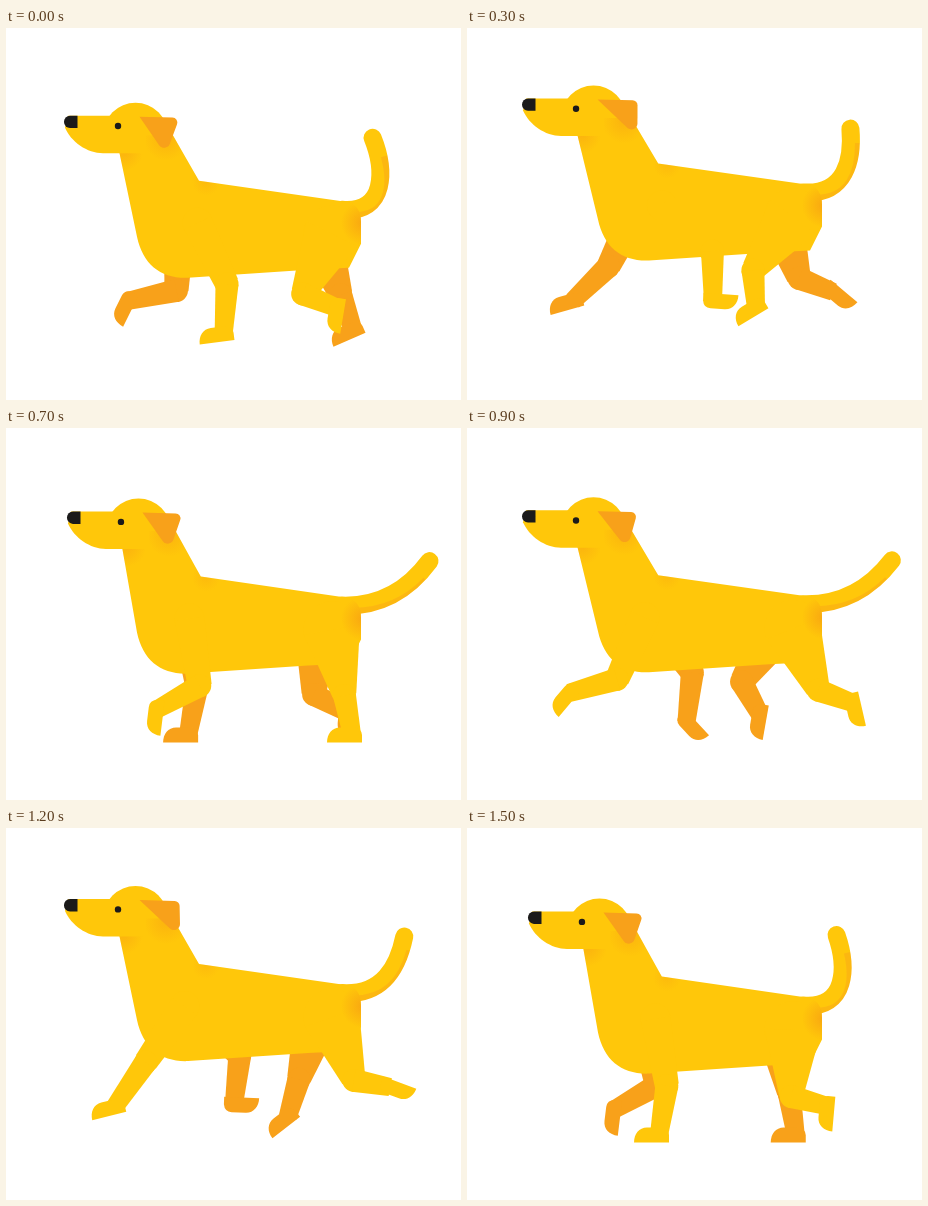
Recreate the animation shown at these times as an HTML page with a canvas. Size 455 px wide and 372 px high, loop 1600 ms.

```html
<!DOCTYPE html>
<html>
<head>
<meta charset="utf-8">
<title>Walking dog</title>
<style>
html, body { margin: 0; width: 100%; height: 100%; overflow: hidden; background: #fff; }
canvas { display: block; }
</style>
</head>
<body>
<canvas id="stage" width="455" height="372"></canvas>
<script>
const ctx = document.getElementById('stage').getContext('2d');
const YELLOW = '#ffc70a', ORANGE = '#f8a11a', BLACK = '#1b1a1a';
const STEPS = 16, STEP_MS = 100, GROUND = 307;

// Each leg type walks its foot along a closed smooth path: x, y, toe angle (90 = toe down).
// The far leg follows the same path half a cycle later with a shorter stride.
const FORE = {
  thigh: 68, shank: 50, bend: 1, follow: 0.12, pivot: 126, stride: 0.85, drop: 0,
  path: [[236, 294, 133], [246, 273, 176], [234, 283, 164], [150, 282, 83],
    [102, 265, 50], [102, 273, 16], [124, 287, 14], [192, 312, 0]]
};
const HIND = {
  thigh: 67, shank: 37, bend: -1, follow: 0, pivot: 250, stride: 0.82, drop: 6,
  path: [[302, 280, 80], [289, 279, 31], [296, 290, 45], [346, 312, 0],
    [386, 275, 103], [392, 258, 140], [374, 264, 165], [360, 278, 85]]
};

// Closed Catmull-Rom spline; u counts key points.
function spline(points, u) {
  const n = points.length, i = Math.floor(u), f = u - i;
  const [a, b, c, d] = [-1, 0, 1, 2].map(k => points[(i + k + n) % n]);
  return b.map((v, j) => v + f / 2 * (c[j] - a[j]
    + f * (2 * a[j] - 5 * v + 4 * c[j] - d[j] + f * (3 * (v - c[j]) + d[j] - a[j]))));
}

function disc(x, y, r) {
  ctx.beginPath();
  ctx.arc(x, y, r, 0, 7);
  ctx.fill();
}

function taper(x1, y1, r1, x2, y2, r2) {
  const len = Math.hypot(x2 - x1, y2 - y1);
  const nx = (y1 - y2) / len, ny = (x2 - x1) / len;
  ctx.beginPath();
  ctx.moveTo(x1 + nx * r1, y1 + ny * r1);
  ctx.lineTo(x2 + nx * r2, y2 + ny * r2);
  ctx.lineTo(x2 - nx * r2, y2 - ny * r2);
  ctx.lineTo(x1 - nx * r1, y1 - ny * r1);
  ctx.fill();
}

function foot(x, y, angle) {
  ctx.save();
  ctx.translate(x, y);
  ctx.rotate(-angle * Math.PI / 180);
  ctx.beginPath();
  ctx.moveTo(10, 7.5);
  ctx.lineTo(-25, 7.5);
  ctx.bezierCurveTo(-25, -1, -20, -7.5, -12, -7.5);
  ctx.lineTo(2, -7.5);
  ctx.quadraticCurveTo(9, -7.5, 10, 0);
  ctx.fill();
  ctx.restore();
}

function leg(kind, step, far, hipX, hipY, hipR) {
  const phase = (step + (far ? 8 : 0) + STEPS - 1) % STEPS;
  let [x, y, angle] = spline(kind.path, phase / 2);
  if (far) {
    x = kind.pivot + (x - kind.pivot) * kind.stride;
    y += kind.drop;
  }
  y = Math.min(y, GROUND);
  angle *= Math.min(1, (GROUND - y) / 10);   // lies flat on the ground

  // Knee from the two bone lengths.
  const hx = hipX + (x - hipX) * kind.follow;
  const { thigh, shank, bend } = kind;
  const reach = Math.hypot(x - hx, y - hipY);
  const cos = (thigh ** 2 + reach ** 2 - shank ** 2) / (2 * thigh * reach);
  const turn = Math.atan2(x - hx, y - hipY) + bend * Math.acos(Math.min(1, cos));
  const kx = hx + thigh * Math.sin(turn), ky = hipY + thigh * Math.cos(turn);

  ctx.fillStyle = far ? ORANGE : YELLOW;
  disc(hx, hipY, hipR);
  taper(hx, hipY, hipR, kx, ky, 12);
  disc(kx, ky, 11.5);
  taper(kx, ky, 11.5, x, y, 9);
  foot(x, y, angle);
}

function tail(step) {
  const s = (1 - Math.cos((step - 0.15) * Math.PI / 8)) / 2;
  const path = () => {
    ctx.beginPath();
    ctx.moveTo(336, 183);
    ctx.bezierCurveTo(381 - 7 * s, 187 - 3 * s, 379 + 25 * s, 142 + 26 * s, 366.5 + 60 * s, 111 + 29 * s);
    ctx.stroke();
  };
  ctx.save();
  ctx.lineCap = 'round';
  ctx.lineWidth = 18;
  ctx.strokeStyle = YELLOW;
  path();
  ctx.globalCompositeOperation = 'source-atop';
  ctx.globalAlpha = 0.4;
  ctx.lineCap = 'butt';
  ctx.lineWidth = 8;
  ctx.strokeStyle = ORANGE;
  ctx.setLineDash([85, 999]);
  ctx.translate(8, 6);
  path();
  ctx.restore();
}

function torso(sway) {
  const p = new Path2D();
  p.moveTo(113 + sway, 124);
  p.lineTo(131, 210);
  p.bezierCurveTo(137, 238, 155, 252, 182, 251);
  p.lineTo(302, 243);
  p.lineTo(343, 241);
  p.lineTo(355, 217);
  p.lineTo(355, 195);
  p.quadraticCurveTo(355, 180, 343, 175.5);
  p.lineTo(193 + sway * 0.6, 154);
  p.lineTo(158 + sway, 93);
  return p;
}

function shade(x, y, r, alpha) {
  const g = ctx.createRadialGradient(x, y, 0, x, y, r);
  g.addColorStop(0, `rgba(246,150,20,${alpha})`);
  g.addColorStop(1, 'rgba(246,150,20,0)');
  ctx.fillStyle = g;
  ctx.fillRect(x - r, y - r, 2 * r, 2 * r);
}

function head(step) {
  ctx.fillStyle = YELLOW;
  ctx.beginPath();
  ctx.arc(129.5, 108.5, 32.5, Math.PI, 0);
  ctx.fill();
  ctx.beginPath();
  ctx.moveTo(62, 89);
  ctx.lineTo(140, 89);
  ctx.lineTo(140, 126.5);
  ctx.lineTo(97, 126.5);
  ctx.bezierCurveTo(81, 126.5, 65, 115, 59, 101);
  ctx.fill();

  const swing = 6 - 7.5 * Math.cos((step + 0.3) * Math.PI / 4);
  ctx.fillStyle = ORANGE;
  ctx.beginPath();
  ctx.moveTo(133.5, 90);
  ctx.arcTo(173.5, 91, 161 + swing, 128, 5);
  ctx.arcTo(161 + swing, 128, 133.5, 90, 6);
  ctx.fill();

  ctx.fillStyle = BLACK;
  ctx.beginPath();
  ctx.roundRect(58, 89, 13.5, 12.3, [6, 0, 0, 6]);
  ctx.fill();
  disc(112, 99.3, 3.2);
}

function draw(step) {
  const stride = step * Math.PI / 4;
  const bob = -12 + 8.3 * Math.cos(stride) - Math.sin(stride) + 2.4 * Math.cos(2 * stride);
  const sway = -4.2 * Math.sin(stride);
  const body = torso(sway);
  ctx.clearRect(0, 0, 455, 372);

  ctx.save();
  ctx.translate(0, bob);
  tail(step);
  ctx.restore();

  leg(HIND, step, true, 312, 205 + bob, 24);
  leg(FORE, step, true, 181, 196 + bob, 16);

  ctx.save();
  ctx.translate(0, bob);
  ctx.fillStyle = YELLOW;
  ctx.fill(body);
  ctx.restore();

  leg(HIND, step, false, 326, 207 + bob, 28.5);
  leg(FORE, step, false, 188, 196 + bob, 15);

  ctx.save();
  ctx.translate(0, bob);
  ctx.save();
  ctx.clip(body);
  shade(357, 196, 22, 0.65);
  shade(118 + sway, 125, 19, 0.4);
  shade(160 + sway, 112, 22, 0.4);
  shade(200, 155, 14, 0.25);
  ctx.restore();
  ctx.translate(sway, 0);
  head(step);
  ctx.restore();
}

function tick() {
  draw(Math.floor(performance.now() / STEP_MS) % STEPS);
  requestAnimationFrame(tick);
}
tick();
</script>
</body>
</html>
```
